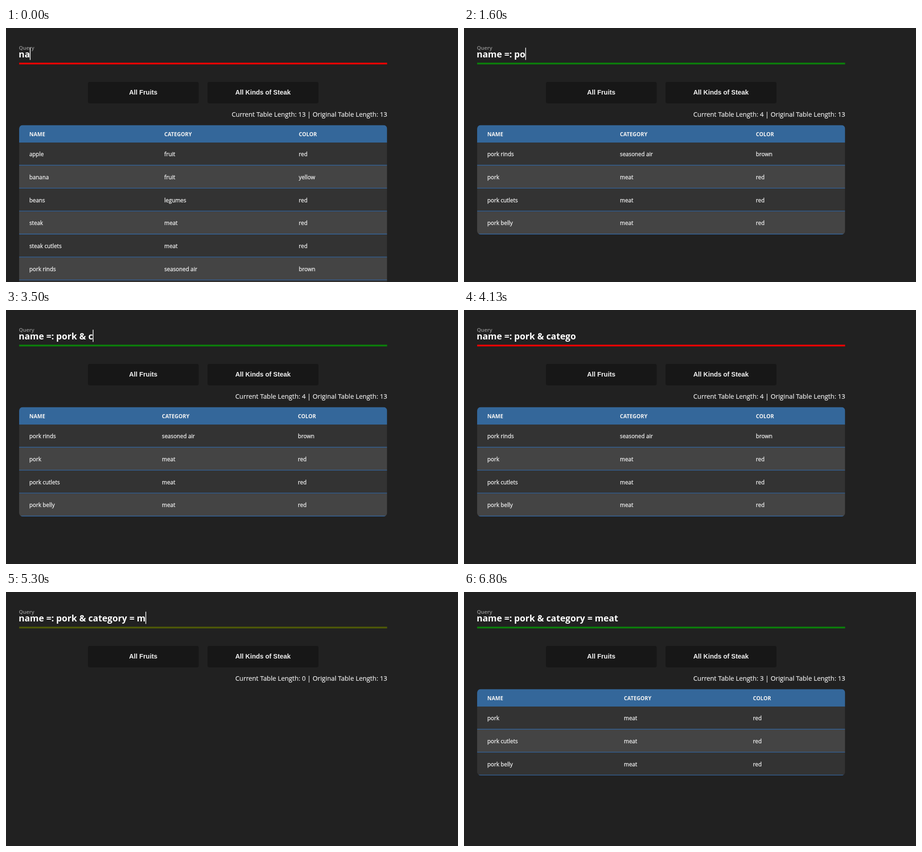
These frames come from a looping animation (998 px wide and 561 px high, 6.86 s). An HTML page:

```html
<!DOCTYPE html>
<html lang="en">
<head>
<meta charset="utf-8">
<title>Table query</title>
<style>
  html, body { margin: 0; width: 100%; height: 100%; overflow: hidden; background: #212121; }
  svg { display: block; width: 998px; height: 561px; }
  text { font-family: "Open Sans", "Noto Sans", sans-serif; fill: #f2f2f2; white-space: pre; }
  .label { font-size: 11.4px; font-weight: 600; fill: #959595; }
  .query { font-size: 19.7px; font-weight: 700; fill: #fff; }
  .button { font: 700 14.4px "Liberation Sans", Arial, sans-serif; text-anchor: middle; }
  .count { font-size: 14.32px; text-anchor: end; stroke: #f2f2f2; stroke-width: .2px; }
  .head { font-size: 11.7px; font-weight: 700; }
  .cell { font-size: 12.25px; stroke: #f2f2f2; stroke-width: .3px; }
</style>
</head>
<body>
<svg viewBox="0 0 998 561">
  <defs><clipPath id="clip"><rect id="clipBox" x="29" y="214.5" width="812.5" rx="8"/></clipPath></defs>
  <text class="label" x="28.5" y="48">Query</text>
  <text class="query" id="query" x="28" y="65"></text>
  <rect id="caret" y="43.5" width="1.5" height="27" fill="#fff"/>
  <rect id="line" x="29" y="76.6" width="812.5" height="3.8"/>
  <rect x="181" y="119" width="244.5" height="47.5" rx="4" fill="#171717"/>
  <rect x="445" y="119" width="245" height="47.5" rx="4" fill="#171717"/>
  <text class="button" x="303" y="147">All Fruits</text>
  <text class="button" x="567.3" y="147">All Kinds of Steak</text>
  <text class="count" id="count" x="841.8" y="196"></text>
  <g id="table" clip-path="url(#clip)"></g>
</svg>
<script>
const LOOP = 6860, BLINK = 500, FADE = 100;
const HEAD = 214.5, TOP = 253.2, ROW = 50.7, TOTAL = 13;
const $ = id => document.getElementById(id);

const foods = `apple,fruit,red
banana,fruit,yellow
beans,legumes,red
steak,meat,red
steak cutlets,meat,red
pork rinds,seasoned air,brown
pork,meat,red
pork cutlets,meat,red
pork belly,meat,red`.split('\n').map(row => row.split(','));

// Typing bursts: text, start, time per key
const bursts = [
  ['na', 0, 0], ['me', 30, 0], [' =', 560, 140], [': ', 1130, 130], ['po', 1460, 140],
  ['rk', 1800, 130], [' & ', 3000, 65], ['cate', 3500, 110], ['gory ', 4030, 100],
  ['= ', 5000, 65], ['meat', 5300, 110]
];
const caretResets = [-140, 1460, 5300];

const typedAt = t => bursts.map(([text, start, step]) =>
  [...text].filter((_, i) => start + i * step <= t).join('')).join('');

const caretAt = t => {
  const since = t - caretResets.findLast(reset => reset <= t);
  return Math.floor(since / BLINK) % 2 ? 0 : 1;
};

const ramp = (t, start) => Math.min(1, Math.max(0, (t - start) / FADE));
const validAt = t => ramp(t, 1410) - ramp(t, 3500) + ramp(t, 5230);

// An unfinished query keeps the result of its longest valid beginning.
function search(query) {
  for (let n = query.length; n > 0; n--) {
    const match = /^name =: (\w+)(?: & category = (\w+))?$/.exec(query.slice(0, n));
    if (!match) continue;
    const [, part, kind] = match;
    return foods.filter(food => food[0].includes(part) && (!kind || food[1] === kind));
  }
  return foods;
}

function columns(rows) {
  if (rows.length === foods.length) return [51.5, 349.5, 646.5];
  return rows.includes(foods[5]) ? [51.5, 344.3, 644.5] : [51.5, 353, 638];
}

const rect = (y, h, fill) => `<rect x="29" y="${y}" width="812.5" height="${h}" fill="${fill}"/>`;
const texts = (cls, words, cols, y) =>
  words.map((word, i) => `<text class="${cls}" x="${cols[i]}" y="${y}">${word}</text>`).join('');

function drawTable(rows) {
  const count = rows.length === foods.length ? TOTAL : rows.length;
  const cols = columns(rows);
  $('count').textContent = `Current Table Length: ${count} | Original Table Length: ${TOTAL}`;
  $('clipBox').setAttribute('height', rows.length ? TOP - HEAD + ROW * rows.length : 0);
  let out = rect(HEAD, TOP - HEAD, '#34679a');
  out += texts('head', ['NAME', 'CATEGORY', 'COLOR'], cols, 238.5);
  rows.forEach((row, i) => {
    const y = TOP + i * ROW;
    out += rect(y, ROW, i % 2 ? '#444' : '#333');
    out += rect(y + ROW - 1.6, 1.6, '#34659f');
    out += texts('cell', row, cols, y + 30.1);
  });
  $('table').innerHTML = out;
}

let current;
function render(now) {
  const t = now % LOOP;
  const text = typedAt(t);
  if (text !== current) {
    current = text;
    $('query').textContent = text;
    $('caret').setAttribute('x', 27.8 + $('query').getComputedTextLength());
    drawTable(search(text));
  }
  $('caret').setAttribute('opacity', caretAt(t));

  const k = validAt(t);
  $('line').setAttribute('fill', `rgb(${236 - 225 * k}, ${128 * k}, ${10 * k})`);
}

let start;
function tick(now) {
  start ??= now;
  render(now - start);
  requestAnimationFrame(tick);
}
render(0);
requestAnimationFrame(tick);
</script>
</body>
</html>
```
